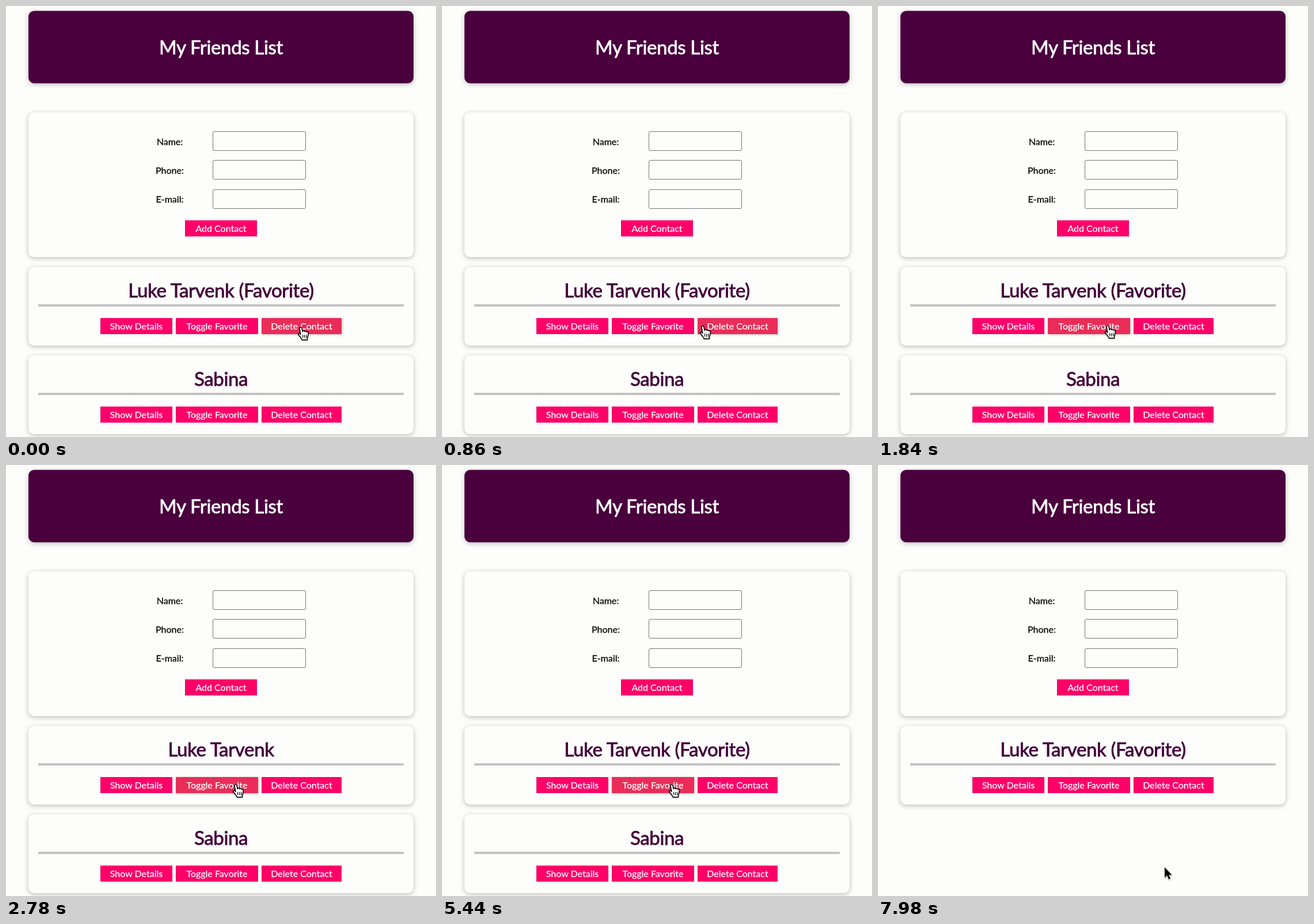
Write an HTML page that moves like this. It is 747 by 750 pixels and loops after 8 s.

```html
<!DOCTYPE html>
<html lang="en">
<head>
<meta charset="utf-8">
<title>My Friends List</title>
<style>
  html, body { margin: 0; width: 100%; height: 100%; overflow: hidden; background: #fdfdfc; }
  svg { display: block; width: 747px; height: 750px; }
  text {
    font-family: Lato, "Open Sans", sans-serif; font-size: 16px; text-anchor: middle;
    fill: #0c0c0c; stroke: #0c0c0c; stroke-width: .35px;
  }
  .title { font-size: 33px; letter-spacing: -.35px; fill: #43003a; stroke: #43003a; stroke-width: .8px; }
  .card { fill: #fdfdfc; filter: drop-shadow(0 2px 4px rgba(0, 0, 0, .26)); }
  .header { fill: #49003d; }
  .field { fill: #fdfdfc; stroke: #767676; }
  .button rect { fill: #ff0068; shape-rendering: crispEdges; }
  .button .edge { fill: #dc0059; }
  .button text, .light { fill: #fff; stroke: #fff; }
  .button text { stroke-width: .25px; }
  .hover rect, .hover .edge { fill: #e92d58; }
  .hover rect { filter: drop-shadow(1px 1px 2px rgba(0, 0, 0, .26)); }
  #cursor { filter: drop-shadow(0 1px 1px rgba(0, 0, 0, .35)); }
</style>
</head>
<body>
<svg id="stage" viewBox="0 0 747 750"></svg>
<script>
const LOOP = 8000;
const NAMES = ["Luke Tarvenk", "Sabina"];
const ACTIONS = [["Show Details", 164, 125], ["Toggle Favorite", 295, 143], ["Delete Contact", 444, 139]];

const label = (text, x, y, cls = "") => `<text class="${cls}" x="${x}" y="${y}">${text}</text>`;
const card = (y, height, cls = "") =>
  `<rect class="card ${cls}" x="39" y="${y}" width="669" height="${height}" rx="10"/>`;
const button = (text, x, y, width, id = "") =>
  `<g class="button" id="${id}"><rect x="${x}" y="${y}" width="${width}" height="28"/>` +
  `<path class="edge" d="M${x} ${y}h1v28h-1Z"/>` + label(text, x + width / 2, y + 19.5) + "</g>";
const field = (text, i) => label(text, 284.5, 241.5 + i * 50.3) +
  `<rect class="field" x="359.5" y="${218.5 + Math.round(i * 50.4)}" width="161" height="33" rx="2.5"/>`;

const friend = (name, i) => {
  const y = 454 + i * 154;
  return `<g id="friend${i}">` + card(y, 137) + label(name, 373.5, y + 53, "title") +
    `<rect x="56" y="${y + 65}" width="635" height="4" fill="#c4c3c4"/>` +
    ACTIONS.map(([text, x, width], j) => button(text, x, y + 89, width, `action${i}${j}`)).join("") + "</g>";
};

const stage = document.getElementById("stage");
stage.innerHTML =
  card(8.5, 126, "header") + label("My Friends List", 373.5, 83.5, "title light") +
  card(185, 252) + ["Name:", "Phone:", "E-mail:"].map(field).join("") +
  button("Add Contact", 311, 373, 125) +
  NAMES.map(friend).join("") +
  `<g id="cursor">
    <g id="hand" fill="#fff" stroke="#000" stroke-width="1.5" stroke-linejoin="round" stroke-linecap="round">
      <path d="M-2 2.5C-2.5-.5 1.5-1 2 2l1 5.5c.5-2 3.6-1.8 3.8.3 .6-1.5 3.3-1.2 3.5.6 .8-1.2 2.9-.5 2.9 1.4 .2 4-.5 5.5-1.7 8.2v4H2.2c0-2-3.4-5.6-6.2-9.2 -1.2-2 1-3 2.6-1.6l1.2 1.2Z"/>
      <path d="M3.6 13.5v4.5M6.6 13.5v4.5M9.6 13.5v4.5" stroke-width="1.2"/>
    </g>
    <path id="arrow" d="M0 0V18L4.2 14.2 7 21 10 19.8 7.2 13.2H12.6Z" stroke="#fff" stroke-width="1.4" paint-order="stroke"/>
  </g>`;

const find = id => document.getElementById(id);
const [cursor, hand, arrow, secondFriend] = ["cursor", "hand", "arrow", "friend1"].map(find);
const heading = document.querySelector("#friend0 .title");
const buttons = document.querySelectorAll(".button");

// time, x, y of the pointer's hot spot
const PATH = [[0, 512, 559], [480, 512, 559], [860, 453, 557], [960, 453, 557],
  [1300, 399, 556], [5640, 399, 556], [6260, 498, 700], [LOOP, 498, 700]];
const HOVERS = [[0, "action02"], [1060, "action01"], [5720, "none"], [6420, "action12"], [7200, "none"]];
const FAVORITE = [[0, true], [2400, false], [3560, true]];
const POINTER = [[0, "hand"], [4160, "none"], [4640, "hand"], [5720, "arrow"], [6220, "hand"], [7240, "arrow"]];

const at = (steps, t) => steps.filter(([start]) => start <= t).pop()[1];
const show = (node, on) => node.style.display = on ? "" : "none";

function pointerAt(t) {
  const i = PATH.findIndex(([time]) => time > t);
  const [t0, x0, y0] = PATH[i - 1], [t1, x1, y1] = PATH[i];
  const p = (t - t0) / (t1 - t0), ease = p * p * (3 - 2 * p);
  return [x0 + (x1 - x0) * ease, y0 + (y1 - y0) * ease];
}

function draw(t) {
  const hovered = at(HOVERS, t), pointer = at(POINTER, t);
  buttons.forEach(b => b.classList.toggle("hover", b.id === hovered));
  heading.textContent = NAMES[0] + (at(FAVORITE, t) ? " (Favorite)" : "");
  show(secondFriend, t < 7200);
  show(hand, pointer === "hand");
  show(arrow, pointer === "arrow");
  cursor.setAttribute("transform", `translate(${pointerAt(t)})`);
}

const start = performance.now();
function tick() {
  draw((performance.now() - start) % LOOP);
  requestAnimationFrame(tick);
}
tick();
</script>
</body>
</html>
```
